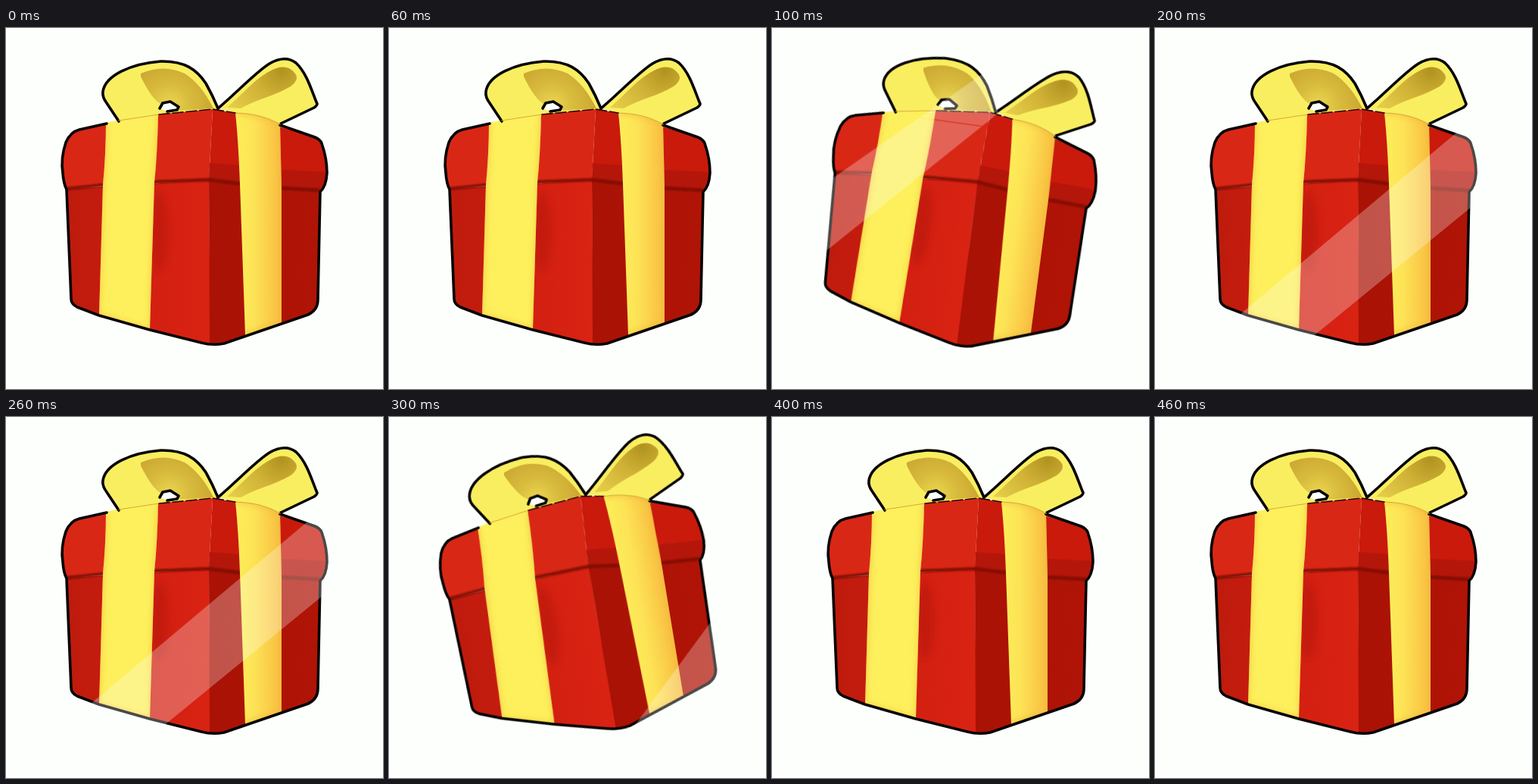
Write an HTML page without scripts that moves like this. It is 498x476 px and loops after 0.5 s.

```html
<!DOCTYPE html>
<html lang="en">
<head>
<meta charset="utf-8">
<title>Wobbling gift</title>
<style>
  html, body { margin: 0; width: 100%; height: 100%; overflow: hidden; background: #fdfffc; }
  svg { display: block; width: 100vw; height: 100vh; }
  .gift { transform-origin: 248px 227px; animation: wobble .5s step-end infinite; }
  .shine path { fill: #fff; fill-opacity: .28; visibility: hidden; animation: flash .5s step-end infinite; }
  .shine .first { animation-delay: -.4s; }
  .shine .second { animation-delay: -.3s; }
  .shine .third { animation-delay: -.2s; }
  .ink { fill: none; stroke: #050302; stroke-width: 3.6; stroke-linejoin: round; stroke-linecap: round; }
  .seam { fill: none; stroke: #7c0a03; stroke-width: 4; filter: url(#soft); }
  .glow { fill: none; stroke: #f0b43a; stroke-width: 9; stroke-opacity: .65; filter: url(#blur); }
  @keyframes wobble {
    0%, 40%, 80%, 100% { transform: none; }
    20% { transform: rotate(7.5deg); }
    60% { transform: rotate(-9.4deg); }
  }
  @keyframes flash {
    0% { visibility: visible; }
    20%, 100% { visibility: hidden; }
  }
</style>
</head>
<body>
<svg viewBox="0 0 498 476" preserveAspectRatio="none">
  <defs>
    <filter id="soft" x="-20%" y="-50%" width="140%" height="200%"><feGaussianBlur stdDeviation=".8"/></filter>
    <filter id="blur" x="-40%" y="-20%" width="180%" height="140%"><feGaussianBlur stdDeviation="4"/></filter>
    <linearGradient id="front">
      <stop offset="0" stop-color="#be1b0d"/><stop offset=".25" stop-color="#c41c0e"/>
      <stop offset=".6" stop-color="#d32011"/><stop offset="1" stop-color="#d92313"/>
    </linearGradient>
    <linearGradient id="side">
      <stop offset="0" stop-color="#a91205"/><stop offset="1" stop-color="#b01406"/>
    </linearGradient>
    <linearGradient id="sideRibbon">
      <stop offset="0" stop-color="#fcee58"/><stop offset=".4" stop-color="#fde356"/><stop offset="1" stop-color="#f8bd40"/>
    </linearGradient>
    <radialGradient id="leftFold" gradientUnits="userSpaceOnUse" cx="216" cy="102" r="56">
      <stop offset="0" stop-color="#ecd750"/><stop offset=".5" stop-color="#d8bb3d"/><stop offset="1" stop-color="#cca832"/>
    </radialGradient>
    <radialGradient id="rightFold" gradientUnits="userSpaceOnUse" cx="364" cy="56" r="86">
      <stop offset="0" stop-color="#b0921f"/><stop offset=".4" stop-color="#cfb035"/><stop offset="1" stop-color="#e6d04a"/>
    </radialGradient>

    <path id="box" d="M133 126L97 134Q85 137 79 151Q72 172 75 191Q76 205 80 213L86 357Q86 364 94 368L123 379L190 398L258 415Q273 419 288 416L364 390L399 378Q412 372 412 358L415 216Q423 209 424 191Q424 172 417 152Q415 147 408 144L362 128"/>
    <path id="leftBow" d="M149 123L133 99Q127 91 128 84C131 62 166 47 204 44C236 43 252 55 264 73Q273 89 280 106"/>
    <path id="rightBow" d="M280 106C303 87 330 58 348 47C362 39 374 39 383 46C398 60 404 84 411 100Q411 102 407 105L363 126"/>
    <path id="lid" d="M273 107L302 112L408 144Q415 147 417 152Q424 172 424 191Q423 209 416 215L364 211L308 204L268 201Z"/>
    <path id="frontBand" d="M132 125Q168 117 201 114Q200 165 196 204L190 397L123 378L128 207Q132 165 132 125Z"/>
    <path id="sideBand" d="M303 112Q338 113 362 127L364 211V389L316 405L309 206Q307 150 303 112Z"/>
    <clipPath id="frontClip"><use href="#frontBand"/></clipPath>
    <clipPath id="sideClip"><use href="#sideBand"/></clipPath>
    <mask id="gift" maskUnits="userSpaceOnUse" x="0" y="0" width="498" height="476">
      <g fill="#fff" stroke="#fff" stroke-width="4">
        <use href="#box"/><use href="#leftBow"/><use href="#rightBow"/>
        <path d="M134 125L202 114L272 107L303 112L362 127Z" stroke="none"/>
      </g>
    </mask>
  </defs>

  <rect width="498" height="476" fill="#fdfffc"/>

  <g class="gift">
    <!-- box -->
    <path fill="url(#front)" d="M80 212L86 357Q86 364 94 368L123 379L190 398L258 415L270 417L268 200Z"/>
    <ellipse cx="202" cy="268" rx="13" ry="52" fill="#b5190b" opacity=".5" filter="url(#blur)"/>
    <path fill="#d92716" d="M133 126L97 134Q85 137 79 151Q72 172 75 191L80 212L129 207L196 204L268 201L273 107L202 114Z"/>
    <path fill="url(#side)" d="M268 200L416 213L412 358Q412 372 399 378L288 416Q278 418 269 417Z"/>
    <use href="#lid" fill="#c91a0c"/>
    <path fill="#b5160a" d="M269 178L308 181L364 187L424 190Q423 208 416 215L364 211L308 204L268 201Z"/>
    <path class="seam" d="M80 212L129 207L196 203L268 200L308 205L364 211L415 214"/>

    <!-- bow -->
    <use href="#leftBow" fill="#f9ee60"/>
    <path fill="#f9ee60" d="M146 123L202 115L280 107L270 90L150 110Z"/>
    <path fill="url(#leftFold)" d="M178 60Q208 47 236 60Q258 74 274 106L230 109L216 95L204 100Q192 93 178 64Z"/>
    <path class="ink" style="fill:#fdfffc" d="M203 106L207 99L217 97L228 104L226 108L213 110"/>
    <use href="#rightBow" fill="#f9ee60"/>
    <path fill="url(#rightFold)" d="M292 105C316 84 333 62 357 53Q373 48 382 60Q388 68 376 77C352 91 330 94 310 106Z"/>
    <path fill="#d92716" d="M201 114L273 107L270 125L201 125Z"/>

    <!-- ribbons -->
    <use href="#frontBand" fill="#fdf05c"/>
    <g clip-path="url(#frontClip)"><path class="glow" d="M129 125L125 207L119 381L194 402L200 204L205 114"/></g>
    <use href="#sideBand" fill="url(#sideRibbon)"/>
    <g clip-path="url(#sideClip)"><path class="glow" d="M312 408L368 391V211L365 125Q338 110 303 109"/></g>

    <!-- outlines -->
    <use href="#box" class="ink"/>
    <use href="#leftBow" class="ink"/>
    <use href="#rightBow" class="ink"/>
    <path class="ink" style="stroke:#d9a93a;stroke-width:1.2" d="M149 122L202 114M303 112Q338 113 362 127"/>
    <path class="ink" style="stroke:#2a0703;stroke-width:1.6" stroke-dasharray="14 4" d="M202 114L273 107L303 112"/>

    <!-- shine bands keep their stage angle while the mask follows the gift -->
    <g class="shine" mask="url(#gift)">
      <g transform="rotate(-7.5 248 227)"><path class="first" d="M60 212L270 66L298 47V113L60 303Z"/></g>
      <path class="second" d="M100 388L440 103V218L190 422H100Z"/>
      <g transform="rotate(9.4 248 227)"><path class="third" d="M315 420L440 250V420Z"/></g>
    </g>
  </g>
</svg>
</body>
</html>
```
